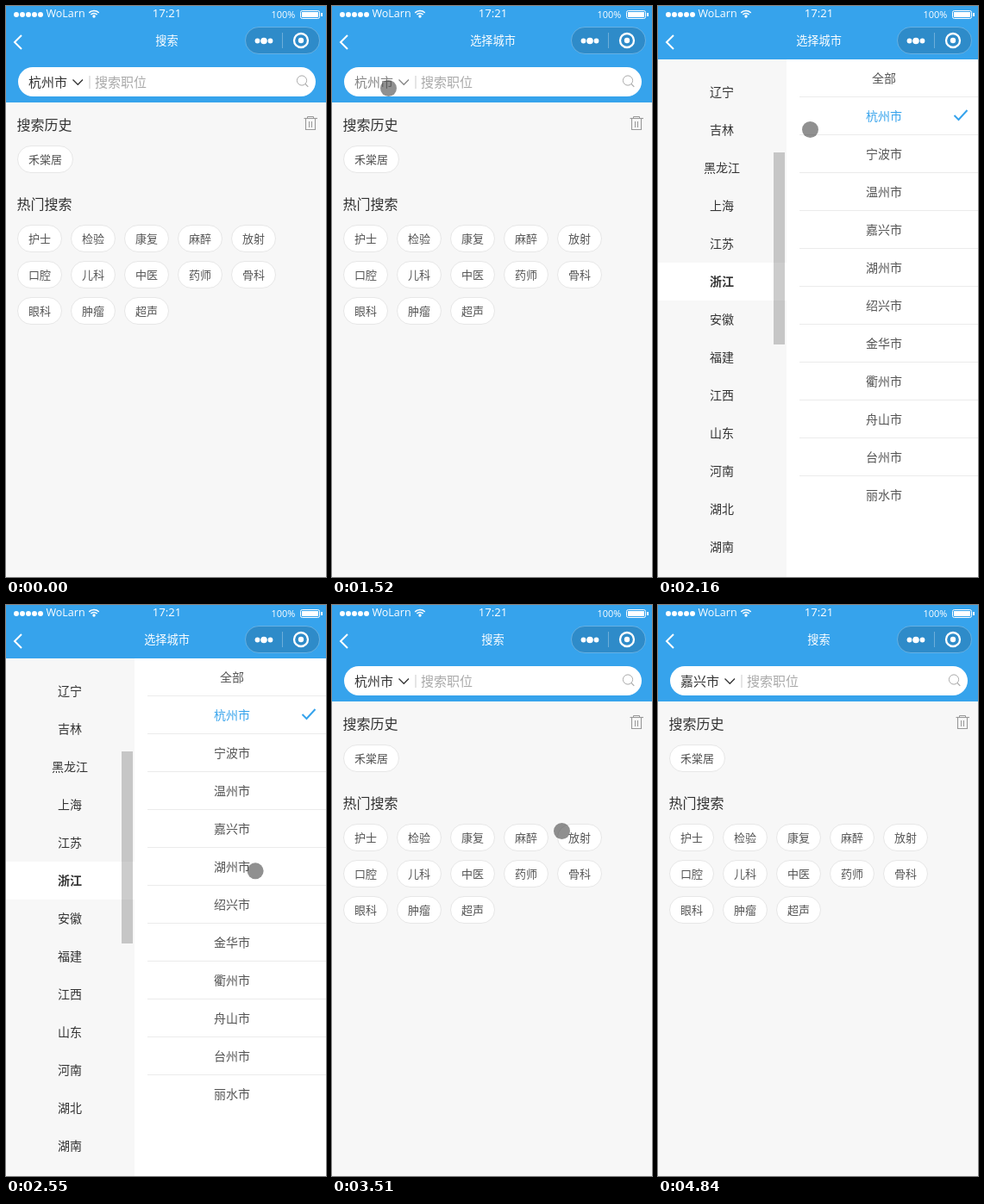
An HTML page with a canvas that plays this animation: 371x663 px, repeating every 5.85 s.

```html
<!DOCTYPE html>
<html lang="zh-CN">
<head>
<meta charset="utf-8">
<title>选择城市</title>
<style>
html, body { margin: 0; width: 100%; height: 100%; overflow: hidden; background: #f7f7f7; }
canvas { display: block; width: 371px; height: 663px; }
</style>
</head>
<body>
<canvas id="stage" width="371" height="663"></canvas>
<script>
const ctx = document.getElementById('stage').getContext('2d');
const W = 371, H = 663, LOOP = 5850;
const BLUE = '#36a3ec', PALE = '#f7f7f7';
const CJK = '"Noto Sans CJK SC", "Noto Sans CJK", sans-serif';
const LATIN = '"Open Sans", "Noto Sans", sans-serif';

const hotTags = '护士 检验 康复 麻醉 放射 口腔 儿科 中医 药师 骨科 眼科 肿瘤 超声'.split(' ');
const provinces = '辽宁 吉林 黑龙江 上海 江苏 浙江 安徽 福建 江西 山东 河南 湖北 湖南'.split(' ');
const cities = '全部 杭州市 宁波市 温州市 嘉兴市 湖州市 绍兴市 金华市 衢州市 舟山市 台州市 丽水市'.split(' ');

// Pointer moves: start, end, number of steps, way points; it rests until the next move.
const moves = [
  { from: 110, to: 110, steps: 1, pts: [[369, 645]], until: 190 },
  { from: 430, to: 990, steps: 8, pts: [[222, 209], [131, 137], [85, 106], [65.5, 95.5]], until: 1690 },
  { from: 1690, to: 2250, steps: 8, until: 2310,
    pts: [[65.5, 95.5], [68, 96], [73, 98], [82, 101], [97, 107], [130, 120], [176.5, 143.5], [231, 198]] },
  { from: 2310, to: 2880, steps: 8, pts: [[262, 240], [289, 309], [280, 285], [269, 263]], until: 2960 },
  { from: 2960, to: 2960, steps: 1, pts: [[266.5, 262.5]], until: 3510 },
  { from: 3510, to: 3980, steps: 7, pts: [[266.5, 262.5], [270, 263], [291, 269], [320, 294]], until: 4130 },
  { from: 4130, to: 4690, steps: 8, until: 4770,
    pts: [[300, 294], [258, 296], [208.5, 303.5], [181, 330], [177, 385], [185, 460], [203, 535], [230, 602]] },
  { from: 4770, to: 4770, steps: 1, pts: [[267, 656]], until: 4840 }
];

function spline(pts, u) {
  const last = pts.length - 1;
  const i = Math.min(Math.floor(u * last), Math.max(last - 1, 0));
  const f = u * last - i;
  const at = k => pts[Math.max(0, Math.min(last, k))];
  return [0, 1].map(d => {
    const a = at(i - 1)[d], b = at(i)[d], c = at(i + 1)[d], e = at(i + 2)[d];
    return b + 0.5 * f * (c - a + f * (2 * a - 5 * b + 4 * c - e + f * (3 * (b - c) + e - a)));
  });
}

function pointerAt(t) {
  const m = moves.find(m => t >= m.from && t < m.until);
  if (!m) return null;
  const n = m.steps - 1;
  if (!n) return m.pts[0];
  // the small lead absorbs the rounding of step times to 10 ms
  const step = Math.min(n, Math.floor((t - m.from) / (m.to - m.from) * n + 0.15));
  return spline(m.pts, step / n);
}

function rect(x, y, w, h, color) {
  ctx.fillStyle = color;
  ctx.fillRect(x, y, w, h);
}

function pill(x, y, w, h, r, fill, stroke) {
  ctx.beginPath();
  ctx.roundRect(x, y, w, h, r);
  if (fill) {
    ctx.fillStyle = fill;
    ctx.fill();
  }
  if (stroke) {
    ctx.strokeStyle = stroke;
    ctx.lineWidth = 1;
    ctx.stroke();
  }
}

function dot(x, y, r, color) {
  ctx.beginPath();
  ctx.arc(x, y, r, 0, Math.PI * 2);
  ctx.fillStyle = color;
  ctx.fill();
}

function arc(x, y, r, color, width, a = 0, b = Math.PI * 2) {
  ctx.beginPath();
  ctx.arc(x, y, r, a, b);
  ctx.strokeStyle = color;
  ctx.lineWidth = width;
  ctx.stroke();
}

function line(pts, color, width) {
  ctx.beginPath();
  pts.forEach(p => ctx.lineTo(p[0], p[1]));
  ctx.strokeStyle = color;
  ctx.lineWidth = width;
  ctx.stroke();
}

// y is the visual middle of the glyphs
function text(s, x, y, size, color, align = 'left', weight = 400, family = CJK) {
  ctx.font = `${weight} ${size}px ${family}`;
  ctx.textAlign = align;
  ctx.fillStyle = color;
  ctx.fillText(s, x, y + size * (family === CJK ? 0.38 : 0.357));
}

function statusBar() {
  for (let i = 0; i < 5; i++) dot(12 + 7 * i, 10, 3, '#fff');
  text('WoLarn', 46.5, 9, 12.5, '#fff', 'left', 500, LATIN);
  const up = -Math.PI / 2;
  [8, 5].forEach(r => arc(102, 13.5, r, '#fff', 1.6, up - 0.8, up + 0.8));
  dot(102, 12, 1.7, '#fff');
  text('17:21', 186.5, 8.5, 13.2, '#fff', 'center', 500, LATIN);
  text('100%', 307.5, 10, 11, '#fff', 'left', 500, LATIN);
  pill(341.5, 5.5, 22, 9, 2, null, '#fff');
  rect(343, 7, 19, 6, '#fff');
  rect(365, 8, 2, 4, '#fff');
}

function header(title, height) {
  rect(0, 0, W, height, BLUE);
  statusBar();
  line([[18, 34], [10, 42], [18, 50]], '#fff', 2);
  text(title, 186.5, 40, 13.2, '#fff', 'center', 500);
  pill(277.5, 24.5, 86, 31, 15.5, 'rgba(0,0,0,.15)', 'rgba(255,255,255,.25)');
  dot(291.5, 40.5, 2.9, '#fff');
  dot(299, 40.5, 3.8, '#fff');
  dot(306.5, 40.5, 2.9, '#fff');
  line([[320.5, 31], [320.5, 49]], 'rgba(255,255,255,.3)', 1);
  arc(342, 40, 8, '#fff', 2.3);
  dot(342, 40, 3.2, '#fff');
}

function trash() {
  const c = '#999';
  line([[345.5, 130.5], [361, 130.5]], c, 1.1);
  line([[349.5, 130], [349.5, 128.5], [356.5, 128.5], [356.5, 130]], c, 1);
  line([[347.5, 131], [347.5, 143.5], [358.5, 143.5], [358.5, 131]], c, 1.1);
  [351.5, 354.5].forEach(x => line([[x, 134], [x, 141]], c, 1));
}

function tag(s, x, y, w) {
  pill(x + 0.5, y + 0.5, w - 1, 31, 15.5, '#fff', '#e7e7e7');
  text(s, x + w / 2, y + 16, 13, '#555', 'center');
}

function searchPage(title, city, pressed) {
  rect(0, 0, W, H, PALE);
  header(title, 112);
  pill(14, 71, 345, 34, 17, '#fff');
  const ink = pressed ? '#858585' : '#333';
  text(city, 26, 88.5, 15, ink);
  line([[77.5, 85.5], [83.3, 91.3], [89, 85.5]], ink, 1.3);
  line([[97, 81], [97, 96]], '#ccc', 1);
  text('搜索职位', 103, 88.5, 15, '#aaa');
  arc(343, 86.5, 5.6, '#aaa', 1);
  line([[347, 90.5], [350.3, 93.8]], '#aaa', 1.1);

  text('搜索历史', 12.5, 137.5, 16, '#333');
  trash();
  tag('禾棠居', 13, 162, 65);
  text('热门搜索', 12.5, 229.5, 16, '#333');
  hotTags.forEach((s, i) => tag(s, 13 + 62 * (i % 5), 254 + 42 * Math.floor(i / 5), 52));
}

function cityPage() {
  rect(0, 0, W, H, '#fff');
  header('选择城市', 62);
  rect(0, 62, 149, H - 62, PALE);
  rect(0, 298, 149, 44, '#fff');
  provinces.forEach((s, i) => {
    const on = s === '浙江';
    text(s, 74, 100 + 44 * i, 14, '#333', 'center', on ? 700 : 400);
  });
  rect(134, 170, 13, 223, 'rgba(0,0,0,.2)');

  cities.forEach((s, i) => {
    const on = s === '杭州市';
    text(s, 262, 84 + 44 * i, 14, on ? BLUE : '#555', 'center');
    if (i < cities.length - 1) rect(164, 105 + 44 * i, W - 164, 1, '#ebebeb');
  });
  line([[343.5, 127], [348.5, 132], [358.5, 121]], BLUE, 2);
}

function draw(t) {
  if (t >= 1690 && t < 3510) {
    cityPage();
  } else {
    const pressed = t >= 1520 && t < 1690;
    searchPage(pressed ? '选择城市' : '搜索', t < 3580 ? '杭州市' : '嘉兴市', pressed);
  }
  const p = pointerAt(t);
  if (p) dot(p[0], p[1], 9.5, 'rgba(60,60,60,.57)');
}

const start = performance.now();
function tick() {
  draw((performance.now() - start) % LOOP);
  requestAnimationFrame(tick);
}
tick();
</script>
</body>
</html>
```
